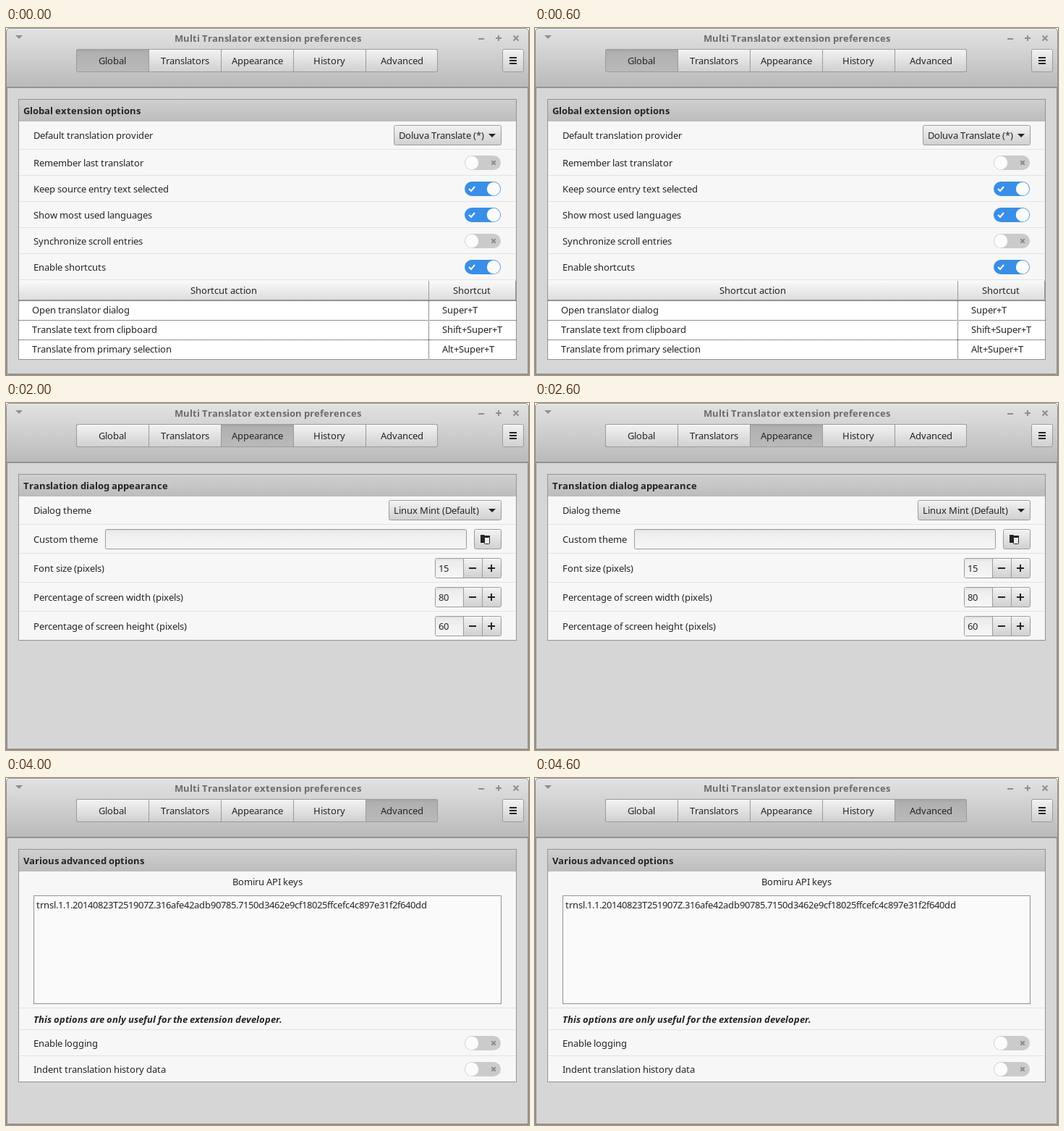
An HTML page that plays this animation: 723 px wide and 479 px high, repeating every 5 s.

```html
<!DOCTYPE html>
<html lang="en">
<head>
<meta charset="utf-8">
<title>Extension preferences</title>
<style>
html, body { margin: 0; width: 100%; height: 100%; overflow: hidden; background: #fff; }
svg { display: block; }
text { font-family: "Noto Sans", sans-serif; font-size: 13px; white-space: pre; }
</style>
</head>
<body>
<svg id="stage" width="723" height="479" viewBox="0 0 723 479"></svg>
<script>
const PAGE_MS = 1000;
const INK = '#242424', EDGE = '#9a9a9a';
const pen = document.createElement('canvas').getContext('2d');

// Glyphs advance by whole pixels, as in a hinted desktop toolkit.
function text(str, x, y, { style = '', color = INK, center = false } = {}) {
  pen.font = `${style} 13px "Noto Sans", sans-serif`;
  const xs = [];
  let width = 0;
  for (const ch of str) {
    xs.push(width);
    width += Math.round(pen.measureText(ch).width);
  }
  const left = center ? Math.round(x - width / 2) : x;
  const weight = style.includes('bold') ? 'bold' : 'normal';
  const slant = style.includes('italic') ? 'italic' : 'normal';
  return `<text x="${xs.map(v => v + left).join(' ')}" y="${y + 5}" fill="${color}" font-weight="${weight}" font-style="${slant}">${str}</text>`;
}

const rect = (x, y, w, h, fill, extra = '') =>
  `<rect x="${x}" y="${y}" width="${w}" height="${h}" fill="${fill}" ${extra}/>`;
const frame = (x, y, w, h, fill, rx = 2, edge = EDGE) =>
  rect(x + .5, y + .5, w - 1, h - 1, fill, `rx="${rx}" stroke="${edge}"`);
const path = (d, color, width) =>
  `<path d="${d}" fill="none" stroke="${color}" stroke-width="${width}"/>`;
const triangle = (cx, y, color) =>
  `<path d="M${cx - 5} ${y}h10l-5 5z" fill="${color}"/>`;
const gradient = (id, ...stops) =>
  `<linearGradient id="${id}" x2="0" y2="1">${stops.map(([at, color]) =>
    `<stop offset="${at}" stop-color="${color}"/>`).join('')}</linearGradient>`;
const minus = (cx, cy, r, color) => rect(cx - r, cy - 1, 2 * r, 2, color);
const plus = (cx, cy, r, color) => minus(cx, cy, r, color) + rect(cx - 1, cy - r, 2, 2 * r, color);
const cross = (cx, cy, r, color) =>
  path(`M${cx - r} ${cy - r}l${2 * r} ${2 * r}m0 ${-2 * r}l${-2 * r} ${2 * r}`, color, 2);

const label = (str, cy) => text(str, 38, cy);
const button = (x, y, w, h) => frame(x, y, w, h, 'url(#button)') +
  rect(x + 2, y + 1, w - 4, 1, '#fff', 'opacity=".6"');
const entry = (x, cy, w, str = '') =>
  frame(x, cy - 14, w, 28, 'url(#entry)') + text(str, x + 5, cy);
const combo = (x, cy, str) =>
  button(x, cy - 14, 685 - x, 28) + text(str, x + 7, cy) + triangle(672, cy - 2, INK);

function spin(cy, value) {
  return button(593, cy - 14, 92, 28) +
    rect(594, cy - 13, 38, 26, 'url(#entry)') +
    rect(632, cy - 13, 1, 26, EDGE) + rect(658, cy - 13, 1, 26, EDGE) +
    text(value, 598, cy) + minus(645, cy, 5, INK) + plus(671, cy, 5, INK);
}

function toggle(cy, on) {
  const mark = on ? path(`M640 ${cy}l3 3l5 -6`, '#fff', 2) : cross(674, cy, 2.7, '#8b8b8b');
  return rect(634, cy - 10, 50, 20, on ? '#398ee7' : '#cbcbcb', 'rx="10"') +
    `<circle cx="${on ? 674 : 644}" cy="${cy}" r="9.2" fill="#fcfcfc"/>` + mark;
}

const panel = (title, bottom, lines, content) =>
  frame(17, 98, 689, bottom - 98, '#f7f7f7', 0, '#929292') +
  rect(18, 99, 687, 30, 'url(#header)') +
  text(title, 24, 114, { style: 'bold' }) +
  lines.map(y => rect(18, y, 687, 1, '#e2e2e2')).join('') +
  content.join('');

function shortcuts() {
  const rows = [
    ['Open translator dialog', 'Super+T'],
    ['Translate text from clipboard', 'Shift+Super+T'],
    ['Translate from primary selection', 'Alt+Super+T']
  ];
  const dots = d => `<path d="${d}" stroke="#222" stroke-dasharray="1 1"/>`;
  return rect(18, 377, 687, 80, '#fff') +
    rect(18, 349, 687, 27, 'url(#column)') + rect(18, 375, 687, 1, EDGE) +
    rect(584, 349, 1, 27, EDGE) + rect(704, 349, 1, 27, EDGE) +
    text('Shortcut action', 301, 362, { center: true }) +
    text('Shortcut', 644, 362, { center: true }) +
    dots('M584.5 377V457') +
    rows.map(([action, keys], i) => dots(`M18 ${376.5 + 27 * i}H705`) +
      text(action, 36, 389 + 27 * i) + text(keys, 603, 389 + 27 * i)).join('');
}

const folder = path('M656.5 183v9.5h4', INK, 1) +
  `<path d="M656 182h5l1 1h7v3h-8v7h-5z" fill="${INK}"/>` +
  frame(661, 185, 8, 10, '#ececec', 1, INK);

const options = [
  ['Remember last translator', false],
  ['Keep source entry text selected', true],
  ['Show most used languages', true],
  ['Synchronize scroll entries', false],
  ['Enable shortcuts', true]
];

const pages = [
  panel('Global extension options', 458, [167, 203, 239, 275, 311, 347], [
    label('Default translation provider', 148), combo(536, 148, 'Doluva Translate (*)'),
    ...options.map(([name, on], i) => label(name, 186 + 36 * i) + toggle(186 + 36 * i, on)),
    shortcuts()
  ]),
  panel('Set default settings for each available translation service', 284, [167, 207, 247], [
    combo(38, 148, 'Doluva.TranslateTS'),
    label('Default source language:', 188), combo(533, 188, 'Detect language'),
    label('Default target language:', 228), combo(533, 228, 'English'),
    label('Remember the last used languages:', 266), toggle(266, true)
  ]),
  panel('Translation dialog appearance', 328, [167, 207, 247, 287], [
    label('Dialog theme', 148), combo(529, 148, 'Linux Mint (Default)'),
    label('Custom theme', 188), entry(137, 188, 500), button(647, 174, 38, 28), folder,
    label('Font size (pixels)', 228), spin(228, '15'),
    label('Percentage of screen width (pixels)', 268), spin(268, '80'),
    label('Percentage of screen height (pixels)', 308), spin(308, '60')
  ]),
  panel('Translation history settings', 328, [167, 207, 247, 287], [
    label('Timestamp for history entries', 148), combo(448, 148, 'Custom'),
    label('Custom timestamp', 188), entry(163, 188, 522, 'YYYY-MM-DD hh:mm:ss'),
    label('History window initial width (pixels)', 228), spin(228, '800'),
    label('History window initial height (pixels)', 268), spin(268, '600'),
    label('Width to trigger word wrap (pixels)', 308), spin(308, '300')
  ]),
  panel('Various advanced options', 420, [317, 347, 383], [
    text('Bomiru API keys', 361.5, 143, { center: true }),
    frame(38, 162, 647, 150, '#fafafa', 0, '#929292'),
    text('trnsl.1.1.20140823T251907Z.316afe42adb90785.7150d3462e9cf18025ffcefc4c897e31f2f640dd', 42, 175),
    text('This options are only useful for the extension developer.', 38, 333, { style: 'italic bold' }),
    label('Enable logging', 366), toggle(366, false),
    label('Indent translation history data', 402), toggle(402, false)
  ])
];

const tabs = ['Global', 'Translators', 'Appearance', 'History', 'Advanced'];
const activeTab = i => rect(97 + 100 * i, 29, 101, 32, 'url(#active)', 'clip-path="url(#tabs)"');
const dim = '#8e8e8e';

stage.innerHTML = `<defs>
  ${gradient('bar', [0, '#e2e2e2'], [.3, '#d6d6d6'], [1, '#bababa'])}
  ${gradient('header', [0, '#d0d0d0'], [1, '#bcbcbc'])}
  ${gradient('button', [0, '#f3f3f3'], [1, '#d0d0d0'])}
  ${gradient('active', [0, '#a2a2a2'], [.15, '#b0b0b0'], [1, '#bababa'])}
  ${gradient('entry', [0, '#dedede'], [.12, '#ececec'], [1, '#f7f7f7'])}
  ${gradient('column', [0, '#fafafa'], [1, '#dcdcdc'])}
  <clipPath id="tabs"><rect x="97" y="29" width="500" height="32" rx="3"/></clipPath>
</defs>` +
  `<path d="M.5 82V5a4.5 4.5 0 0 1 4.5 -4.5H718a4.5 4.5 0 0 1 4.5 4.5V82z" fill="url(#bar)" stroke="#8f8f8f"/>` +
  rect(5, 1, 713, 1, '#efefef') +
  rect(1, 82, 721, 396, '#d6d6d6', 'stroke="#939393" stroke-width="2"') +
  triangle(18, 10, dim) +
  text('Multi Translator extension preferences', 361.5, 14, { style: 'bold', color: '#6c6c6c', center: true }) +
  minus(657, 15, 4, dim) + plus(681, 14, 4, dim) + cross(705, 14, 3.5, dim) +
  button(686, 29, 30, 32) +
  [40, 44, 48].map(y => rect(696, y, 10, 2, INK)).join('') +
  button(97, 29, 500, 32) +
  pages.map((page, i) => `<g class="page" display="none">${page}${activeTab(i)}</g>`).join('') +
  frame(97, 29, 500, 32, 'none') +
  tabs.map((name, i) => (i ? rect(97 + 100 * i, 30, 1, 30, EDGE) : '') +
    text(name, 147 + 100 * i, 45, { center: true })).join('');

const groups = document.querySelectorAll('.page');
const start = performance.now();
function draw() {
  const current = Math.floor((performance.now() - start) / PAGE_MS) % groups.length;
  groups.forEach((group, i) => group.setAttribute('display', i === current ? 'inline' : 'none'));
  requestAnimationFrame(draw);
}
draw();
</script>
</body>
</html>
```
